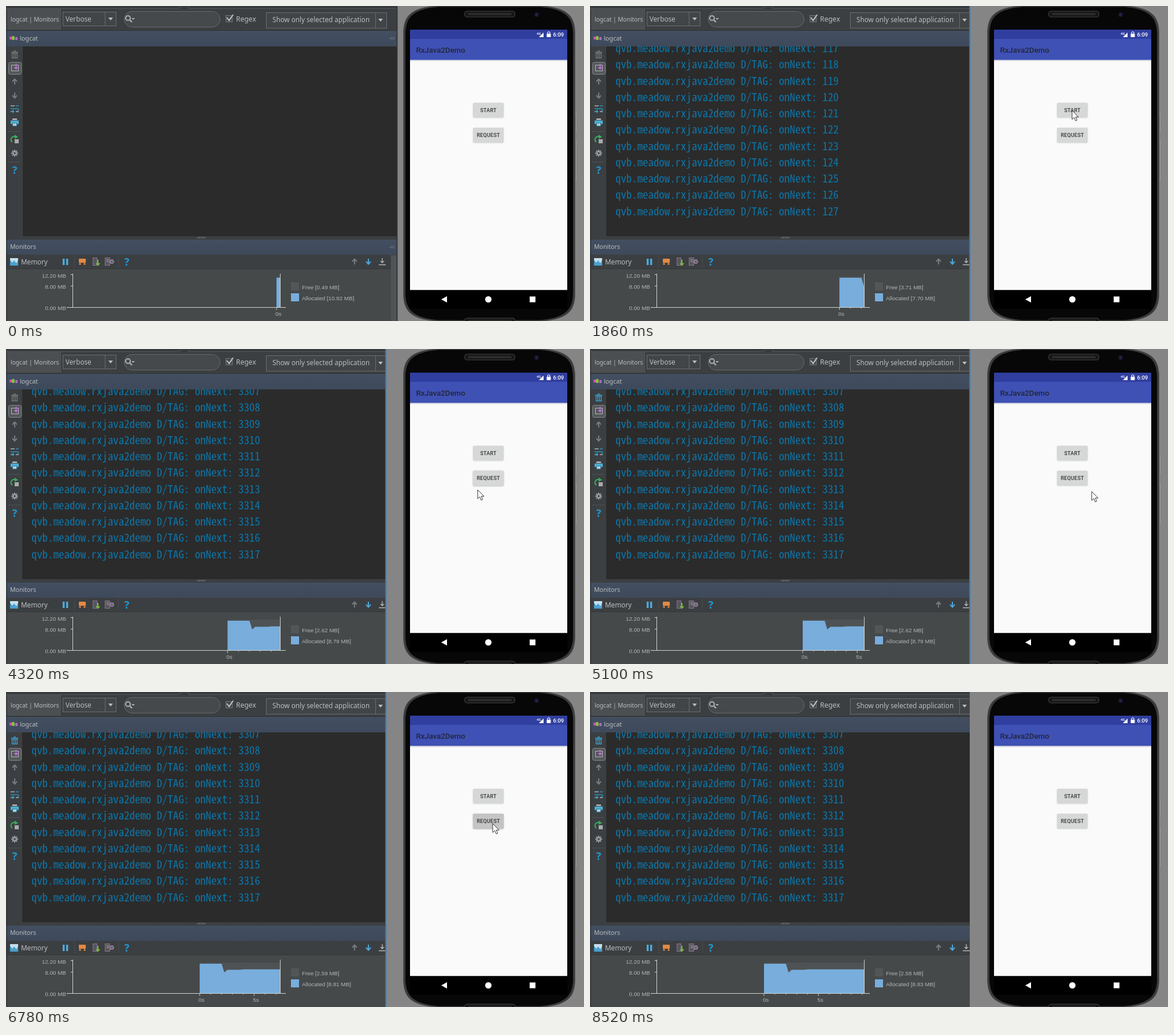
These frames come from a looping animation (1000 px wide and 546 px high, 8.58 s). An HTML page:

```html
<!DOCTYPE html>
<html lang="en">
<head>
<meta charset="utf-8">
<title>Logcat and memory monitor</title>
<style>
html, body { margin: 0; width: 100%; height: 100%; overflow: hidden; background: #3c3f41; }
svg { display: block; width: 1000px; height: 546px; }
text { white-space: pre; }
.ui { font-family: "Noto Sans", "Open Sans", sans-serif; fill: #bcbec0; }
.log { font: 18.85px "Noto Sans Mono CJK SC", "Noto Sans Mono CJK JP", monospace; font-weight: 300; fill: #0d76a9; }
.chart { font: 9.8px "Liberation Sans", Arial, sans-serif; fill: #b4b6b8; }
.app { font-family: Roboto, sans-serif; font-weight: 500; }
</style>
</head>
<body>
<svg viewBox="0 0 1000 546">
  <defs>
    <clipPath id="pane"><rect x="28" y="70" width="648" height="329"/></clipPath>
    <clipPath id="plot"><rect x="115" y="464" width="359" height="58"/></clipPath>
    <clipPath id="key"><rect x="808" y="211" width="53" height="26" rx="2"/></clipPath>
    <linearGradient id="header" x2="0" y2="1"><stop stop-color="#434f61"/><stop offset="1" stop-color="#3e4a5b"/></linearGradient>
    <filter id="blur" x="-20%" y="-40%" width="140%" height="180%"><feGaussianBlur stdDeviation="1.3"/></filter>
  </defs>
  <g id="ide"></g>
  <g id="console" clip-path="url(#pane)"></g>
  <g id="memory"></g>
  <g id="emulator"></g>
  <path id="cursor" d="M0 0V15.5L3.6 12.2 6.1 18 8.7 16.9 6.2 11.3H11Z" fill="#fff" stroke="#333" stroke-width="1"/>
</svg>
<script>
const LOOP = 8580, STEP = 60;
const $ = id => document.getElementById(id);
const rect = (x, y, w, h, fill, more = '') => `<rect x="${x}" y="${y}" width="${w}" height="${h}" fill="${fill}" ${more}/>`;
const path = (d, color, width = 1, more = '') => `<path d="${d}" fill="none" stroke="${color}" stroke-width="${width}" ${more}/>`;
const shape = (d, fill, more = '') => `<path d="${d}" fill="${fill}" ${more}/>`;
const disc = (x, y, r, fill, more = '') => `<circle cx="${x}" cy="${y}" r="${r}" fill="${fill}" ${more}/>`;
const text = (x, y, s, cls, more = '') => `<text x="${x}" y="${y}" class="${cls}" ${more}>${s}</text>`;
const ui = (x, y, s, size) => text(x, y, s, 'ui', `font-size="${size}"`);
const at = (x, y, s) => `<g transform="translate(${x} ${y})">${s}</g>`;
const clamp = v => Math.max(0, Math.min(1, v));
const ramp = (t, a, b) => clamp((t - a) / (b - a));

const arrow = (color, turn) => `<g transform="rotate(${turn})">${path('M0 5V-4M-4 0L0-4.5 4 0', color, 2)}</g>`;
const help = (x, y) => text(x, y, '?', 'ui', 'font-size="18" font-weight="700" text-anchor="middle" style="fill:#1e9bd7"');
const caret = (x, y) => shape(`M${x - 4} ${y - 2}h8l-4 5z`, '#b9bbbd');
const pin = y => path(`M663 ${y}h6m-2-2 2 2-2 2M671 ${y - 3}v6`, '#6d7884');

function drawIde() {
  const gear = Array.from({ length: 8 }, (_, i) => `<rect x="-1" y="-6" width="2" height="4" fill="#9a9d9f" transform="rotate(${i * 45})"/>`).join('');
  $('ide').innerHTML = [
    rect(0, 0, 677, 546, '#3c3f41'),
    rect(0, 0, 677, 5, '#393c3e'), path('M0 4.5H286Q302 6 304 0M316 0V4.5H676', '#55585a'),
    rect(0, 5, 97, 36, '#4b4f51'), path('M96.5 5V41M0 42.5H676', '#2f3234'),
    ui(8, 27, 'logcat | Monitors', 10.2),
    rect(98.5, 10.5, 92, 24, '#414547', 'stroke="#6b6e70"'), path('M171.5 11V34', '#6b6e70'),
    ui(103, 27, 'Verbose', 11.7), caret(181, 22),
    rect(204.5, 9.5, 166, 27, '#45494b', 'rx="13.5" stroke="#66696b"'),
    disc(211, 21, 4, 'none', 'stroke="#aeb1b3" stroke-width="2"'), path('M214 24l4 4', '#aeb1b3', 2.4), shape('M217 21h6l-3 3z', '#aeb1b3'),
    rect(380.5, 16.5, 11, 11, '#45494b', 'stroke="#77797b"'), path('M382 20l4 5 7-10', '#c4c6c8', 2),
    ui(398, 27, 'Regex', 12),
    rect(450.5, 11.5, 208, 27, '#414547', 'stroke="#6b6e70"'), path('M639.5 12V38', '#6b6e70'),
    ui(461, 28, 'Show only selected application', 11.7), caret(648, 24),
    rect(0, 43, 676, 27, 'url(#header)'), pin(56),
    rect(6, 53, 4, 5, '#d24ca7'), rect(10, 52, 5, 7, '#8bbd4b', 'rx="2"'), rect(16, 54, 4, 5, '#b465c8'),
    ui(24, 60, 'logcat', 10.8),
    rect(29, 70, 647, 329, '#2b2b2b'),
    // side toolbar
    at(15, 84, `<g id="trash">${path('M-6-4H6M-2-6H2', 'currentColor', 1.6)}${path('M-4.5-2V6H4.5V-2ZM-1.5-1V5M1.5-1V5', 'currentColor', 1.3)}</g>`),
    rect(4.5, 97.5, 22, 21, '#55595b', 'rx="3" stroke="#85888a"'), rect(9.5, 102.5, 12, 10, 'none', 'stroke="#b3b6b8"'), path('M17.5 100V109M14.5 106l3 3 3-3', '#b76bd0', 2),
    at(15, 131, arrow('#797c7e', 0)), at(15, 155, arrow('#797c7e', 180)),
    path('M8 173H15M8 183H14M17 183H22', '#a9b4ba', 1.5), path('M17 173H22M8 178H20Q22 179 21 182M13 180l-3 3 3 2', '#2394bd', 1.5),
    rect(8, 198.5, 14, 6, '#4cb1d8'), rect(11, 195, 8, 2.5, '#b8bbbd'), rect(11.5, 203, 7, 5, '#c7cacc', 'stroke="#287d9e"'),
    path('M5 217.5H26M5 270.5H26', '#74777a', 1, 'stroke-dasharray="1 2"'),
    path('M17 227A5 5 0 1 0 11 236', '#35b15d', 2), shape('M15 223l6 4-6 3z', '#35b15d'), rect(15, 231, 7, 7, '#a8abad'),
    at(15, 255, gear + disc(0, 0, 4, '#9a9d9f') + disc(0, 0, 1.7, '#3c3f41')), help(15, 291),
    // monitor header and tools
    path('M331 403l2-3m1 3 2-3m1 3 2-3m1 3 2-3m1 3 2-3', '#8b8d8f'),
    rect(0, 405, 676, 26, 'url(#header)'), ui(7, 421, 'Monitors', 10.6), pin(418),
    rect(7, 437, 14, 13, '#4a9fd0'), shape('M7 437H21V440L18 446 14 441 11 445 7 440Z', '#c5dfed'),
    ui(26, 448, 'Memory', 11.7),
    rect(98, 438, 3.5, 11, '#4fa8d8'), rect(104, 438, 3.5, 11, '#4fa8d8'),
    path('M118.5 433V454M194.5 433V454', '#686b6d', 1, 'stroke-dasharray="1 2"'),
    rect(126, 438, 12, 7, '#e08a45', 'rx="1"'), disc(128, 447, 1.7, '#e08a45'), disc(136, 447, 1.7, '#e08a45'),
    rect(150.5, 436.5, 7, 13, '#55565a', 'stroke="#8d7196"'), path('M159 440V449M156 446l3 3 3-3', '#77b940', 2),
    rect(171.5, 436.5, 8, 13, '#55565a', 'stroke="#8d7196"'), path('M174 440H178M174 443H178', '#c0aac6'), disc(183, 443, 3.2, '#666', 'stroke="#a587b0" stroke-width="1.3"'),
    help(209, 450), at(603, 443, arrow('#797c7e', 0)), at(627, 443, arrow('#4fa8d8', 180)),
    path('M651 437V445M648 442l3 3 3-3M645 448.5H657', '#b4b6b8', 1.4),
    rect(0, 456, 666, 90, '#45494a'), path('M0 455.5H666', '#333638'),
    rect(666, 432, 10, 114, '#505456'), path('M1.5 5V546', '#333638'), path('M676.5 0V546', '#2d3032', 1.5)
  ].join('');
}

// phone outline, mirrored about its vertical and horizontal middle
function body(left, top, corner) {
  const right = 1672 - left, bottom = 546 - top, near = left + 10, far = 1672 - near;
  return `M${left} ${top + 46}C${left + 1} ${top + 20} ${near} ${top + 4} ${left + corner} ${top}H${right - corner}` +
    `C${far} ${top + 4} ${right - 1} ${top + 20} ${right} ${top + 46}V${bottom - 46}` +
    `C${right - 1} ${bottom - 20} ${far} ${bottom - 4} ${right - corner} ${bottom}H${left + corner}` +
    `C${near} ${bottom - 4} ${left + 1} ${bottom - 20} ${left} ${bottom - 46}Z`;
}

function drawEmulator() {
  const button = (y, h, s) => text(834.6, y + h / 2 + 3.3, s, 'app', 'font-size="9" letter-spacing=".2" text-anchor="middle" fill="#333"');
  const speaker = y => rect(793.5, y, 87, 10, '#161616', 'rx="4" stroke="#444"') + rect(799, y + 3, 76, 4, '#2b2b2b', 'rx="2"');
  const key = (y, h) => rect(984, y, 2.5, h, '#777', 'stroke="#a8a8a8" stroke-width=".8"');
  $('emulator').innerHTML = [
    '<rect id="backdrop" y="0" width="344" height="546" fill="#858585"/>',
    '<rect id="edge" x="656" y="0" width="2" height="546" fill="#1c80cf"/>',
    key(186, 30), key(234, 67),
    shape(body(687.5, -0.5, 58), '#3a3a3a', 'stroke="#555" stroke-width=".8"'),
    shape(body(691, 1.5, 58), '#070707'),
    speaker(9), speaker(541), disc(918, 15, 4, '#17172e'), disc(918, 15, 2, '#242450'),
    rect(699, 41, 272, 451.5, '#fafafa'), rect(699, 41, 272, 16, '#303f9f'), rect(699, 57, 272, 36.5, '#3f51b5'),
    rect(699, 93.5, 272, 1, '#a4a9c4'), rect(699, 94.5, 272, 1, '#e2e3e7'),
    text(918, 50, '4G', 'app', 'font-size="6" fill="#fff"'), shape('M922 54h8V46z', '#fff'),
    rect(935.5, 48, 7, 6, '#fff', 'rx="1"'), path('M937 48V46Q939 43 941 46V48', '#fff', 1.2),
    text(946.5, 53, '6:09', 'app', 'font-size="9.5" fill="#fff"'),
    text(709.5, 80.5, 'RxJava2Demo', 'app', 'font-size="13.2" fill="#222638"'),
    rect(808, 168, 53, 26, '#777', 'rx="2" opacity=".3" filter="url(#blur)"'),
    '<rect id="start" x="808" y="168" width="53" height="25" rx="2"/>', button(168, 25, 'START'),
    '<rect id="shadow" x="808" y="211.5" width="53" height="26" rx="2" fill="#666" filter="url(#blur)"/>',
    rect(808, 211, 53, 26, '#d6d7d7', 'rx="2"'),
    '<circle id="ripple" cx="842" cy="226" fill="#bcbcbc" clip-path="url(#key)"/>', button(211, 26, 'REQUEST'),
    rect(699, 492.5, 272, 32.5, '#000'), shape('M763 503V514L753 508.5Z', '#fff'), disc(834.5, 508.5, 5.5, '#fff'), rect(906, 503.5, 10, 10, '#fff')
  ].join('');
}

function drawLog(t) {
  if (t < 1440) return '';
  const first = t < 3180 ? 117 : 3307;
  return rect(28, 70, 648, 329, '#2b2b2b') + Array.from({ length: 11 }, (_, i) =>
    text(44, 80 + i * 28.25, `qvb.meadow.rxjava2demo D/TAG: onNext: ${first + i}`, 'log')).join('');
}

// [time, allocated MB]
const usage = [[0, 10.92], [1680, 7.7], [1920, 8.71], [3300, 8.79], [6420, 8.81], [7800, 8.83]];

function drawMemory(t) {
  const x = 468 - t * 0.0196, second = 18.85;
  const used = usage.filter(u => u[0] <= t).pop()[1];
  const free = t < 1680 ? 0.49 : used === 8.81 ? 2.59 : 11.41 - used;
  const area = `M${x} 522V471H${x + 38}L${x + 42.5} 486 ${x + 48} 481.5H${x + 69}L${x + 76} 480.7H480V522Z`;
  let ticks = '';
  for (let s = 0; x + s * second < 474; s++) {
    const tx = x + s * second;
    ticks += path(`M${tx} 522v${s % 5 ? 2.5 : 5}`, '#c4c6c8');
    if (s % 5 === 0) ticks += text(tx - 2, 536.5, s + 's', 'chart');
  }
  const label = (y, s) => text(104, y, s, 'chart', 'text-anchor="end"');
  return `<g clip-path="url(#plot)">${rect(x, 469, 180, 53, '#4e5254')}${shape(area, '#78addc')}</g>` + ticks +
    path('M115.5 464V522M112 465.5H116M112 485.5H116M105 522.5H484M474.5 464V523', '#d2d4d5') +
    label(470.5, '12.20 MB') + label(489.5, '8.00 MB') + label(527, '0.00 MB') +
    rect(493, 479, 14, 14, '#525658') + rect(493, 498, 14, 14, '#78addc') +
    text(512, 491, `Free [${free.toFixed(2)} MB]`, 'chart') +
    text(512, 510, `Allocated [${used.toFixed(2)} MB]`, 'chart');
}

const track = [[300, 1003, 73], [840, 834, 181], [1920, 834, 181], [2520, 838, 229], [3660, 838, 229],
  [4200, 816, 244], [4560, 816, 244], [4980, 873, 250], [5460, 842, 228], [7380, 842, 228], [8160, 1003, 40]];

function cursorAt(t) {
  const i = track.findIndex(k => k[0] > t);
  if (i < 1) return null;
  const [a, b] = [track[i - 1], track[i]];
  const p = ramp(t, a[0], b[0]), e = p * p * (3 - 2 * p);
  return [a[1] + (b[1] - a[1]) * e, a[2] + (b[2] - a[2]) * e];
}

function render(t) {
  $('console').innerHTML = drawLog(t);
  $('memory').innerHTML = drawMemory(t);
  $('trash').style.color = t < 4980 ? '#77797b' : '#3c9fca';

  const focused = t >= 960 && t < 8340;
  $('backdrop').setAttribute('x', t < 960 ? 677.5 : 657);
  $('edge').style.display = focused ? '' : 'none';

  $('start').setAttribute('fill', t >= 1140 && t < 1440 ? '#c6c7c7' : '#d6d7d7');
  const lift = Math.max(ramp(t, 2880, 3120) * (1 - ramp(t, 4320, 4500)), ramp(t, 5880, 6120) * (1 - ramp(t, 6960, 7200)));
  $('shadow').setAttribute('opacity', 0.25 + lift * 0.3);
  const grow = Math.max(t < 3300 ? ramp(t, 2940, 3240) : 0, ramp(t, 5880, 6360));
  $('ripple').setAttribute('r', grow * 42);
  $('ripple').setAttribute('opacity', t < 3300 ? 0.7 : 0.7 * (1 - ramp(t, 6900, 7140)));

  const tip = cursorAt(t);
  $('cursor').style.display = tip ? '' : 'none';
  if (tip) $('cursor').setAttribute('transform', `translate(${tip.map(Math.round).join(' ')})`);
}

drawIde();
drawEmulator();
const begin = performance.now();
function frame() {
  const t = (performance.now() - begin) % LOOP;
  render(Math.floor(t / STEP) * STEP);
  requestAnimationFrame(frame);
}
render(0);
requestAnimationFrame(frame);
</script>
</body>
</html>
```
